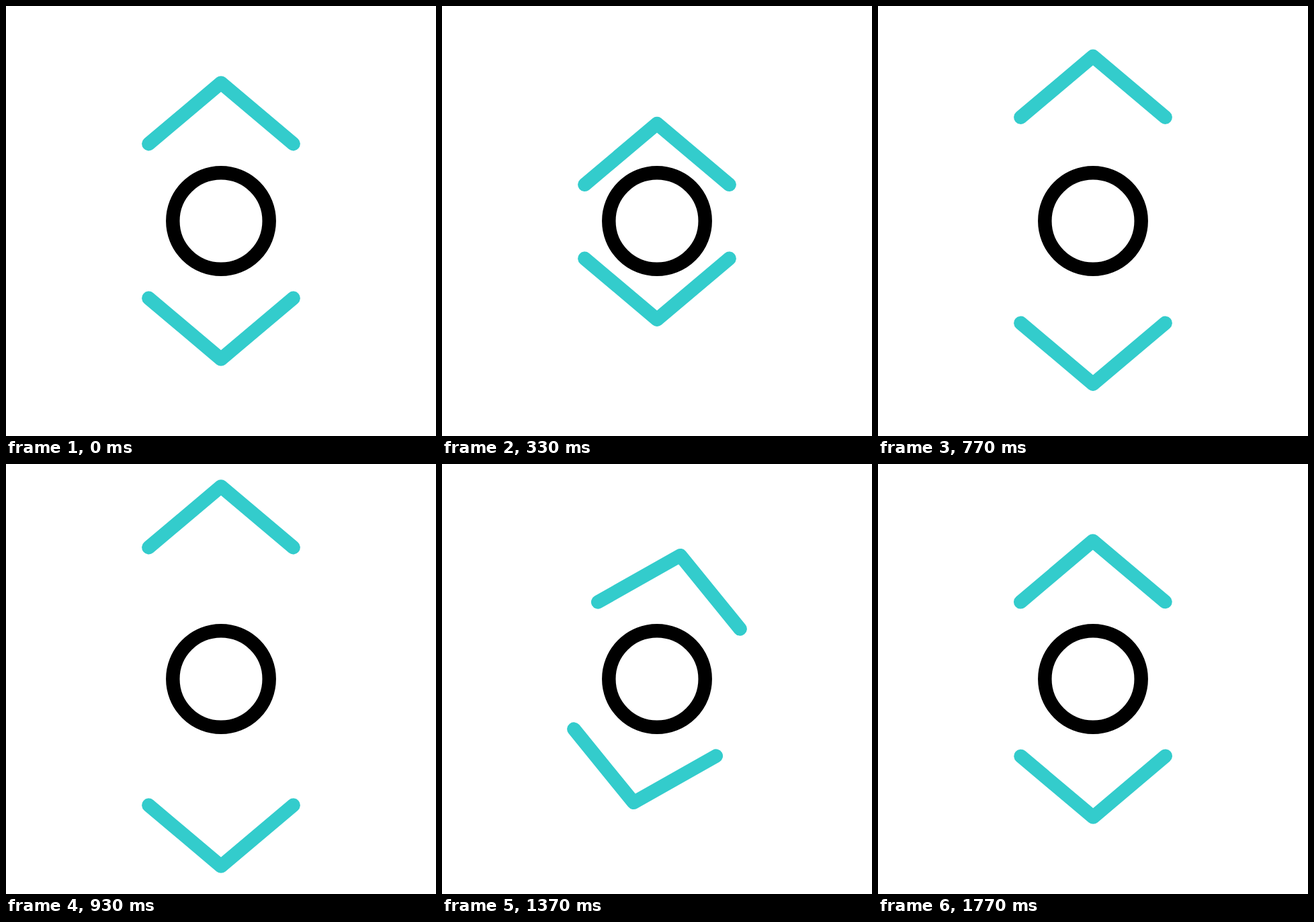
An HTML page that plays this animation: 640x640 px, repeating every 2000 ms.

```html
<!DOCTYPE html>
<html lang="en">
<head>
<meta charset="utf-8">
<title>Chevrons</title>
<style>
  html, body { margin: 0; width: 100%; height: 100%; overflow: hidden; background: #fff; }
  svg { display: block; width: 100%; height: 100%; }
  g, circle { fill: none; stroke-width: 20.5; stroke-linecap: round; stroke-linejoin: round; }
</style>
</head>
<body>
<svg viewBox="-320 -320 640 640">
  <circle r="71.7" stroke="#000"/>
  <g id="pair" stroke="#33cccc">
    <path id="up" d="M-107.6-114.8 0-205.6 107.6-114.8"/>
    <path id="down" d="M-107.6 114.8 0 205.6 107.6 114.8"/>
  </g>
</svg>
<script>
const LOOP = 2000;
const [pair, up, down] = ['pair', 'up', 'down'].map(id => document.getElementById(id));

// Keys: [step, value, slope in, slope out]; 30 steps per second.
// Shift values are distances towards the centre.
const upKeys = [[0, 0], [8.9, 63.5], [17.5, 0], [28, -81, -2.8, 2.9], [40, 20], [46, 0]];
const downKeys = [[0, 0], [8.9, 61.5], [17.9, 0], [28, -73], [40, 20], [46, 0]];
const turnKeys = [[38.88, 0], [53.16, 180]];

function valueAt(keys, x) {
  if (x <= keys[0][0]) return keys[0][1];
  const i = keys.findIndex(key => key[0] > x);
  if (i < 0) return keys[keys.length - 1][1];
  const [x0, v0, , leave = 0] = keys[i - 1];
  const [x1, v1, arrive = 0] = keys[i];
  const span = x1 - x0;
  const u = (x - x0) / span;
  const ease = u * u * (3 - 2 * u);
  return v0 + (v1 - v0) * ease
    + span * (leave * u * (1 - u) ** 2 - arrive * u * u * (1 - u));
}

function draw(ms) {
  // Steps begin on whole hundredths of a second.
  const step = Math.floor((Math.floor((ms % LOOP) / 10) + 0.5) * 0.3);
  up.setAttribute('transform', `translate(0 ${valueAt(upKeys, step)})`);
  down.setAttribute('transform', `translate(0 ${-valueAt(downKeys, step)})`);
  pair.setAttribute('transform', `rotate(${valueAt(turnKeys, step)})`);
}

const start = performance.now();
function tick(now) {
  draw(Math.max(0, now - start));
  requestAnimationFrame(tick);
}
draw(0);
requestAnimationFrame(tick);
</script>
</body>
</html>
```
